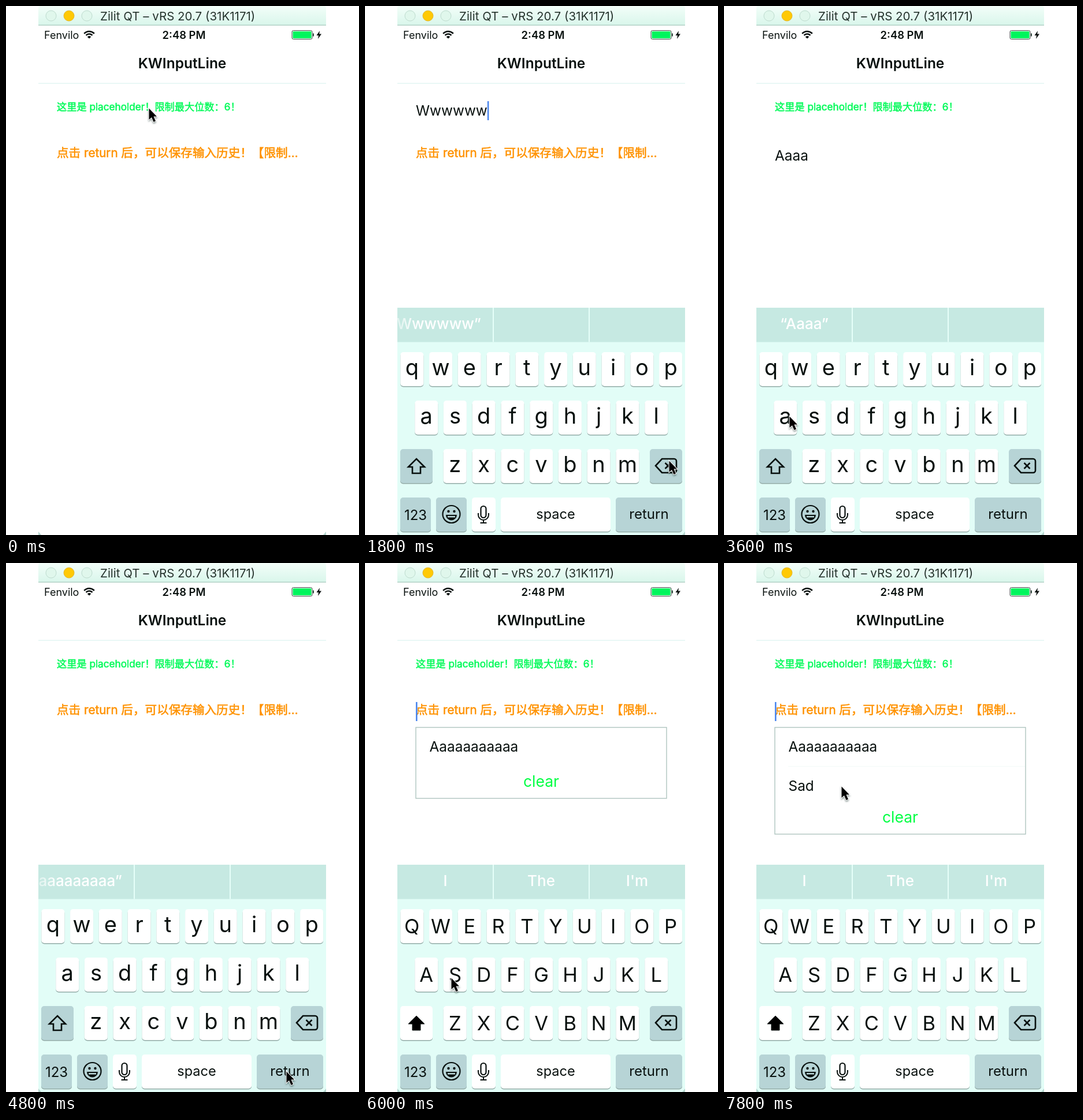
Write an HTML page with a canvas that moves like this. It is 611 px wide and 917 px high and loops after 8 s.

```html
<!DOCTYPE html>
<html lang="zh-CN">
<head>
<meta charset="utf-8">
<title>Input history</title>
<style>
html, body { margin: 0; width: 100%; height: 100%; overflow: hidden; background: #fff; }
canvas { display: block; }
</style>
</head>
<body>
<canvas id="stage" width="611" height="917"></canvas>
<script>
const ctx = document.getElementById('stage').getContext('2d');
const FONT = 'Inter, "Noto Sans CJK SC", "Noto Sans CJK", sans-serif';
const LOOP = 8000, STEP = 600;
const LEFT = 56, RIGHT = 554, MINT = '#e2fdf7', KEY_GREY = '#b7d4d6', INK = '#08100e';
const FIELD_SIZE = 24.4;
const LONG = 'A' + 'a'.repeat(10);
const START_WORDS = ['I', 'The', "I'm"];

// One entry per step: pointer, keyboard case, focused field, field texts, history.
const scenes = [
  { at: [247, 177] },
  { at: [133, 628], keys: 'upper', words: START_WORDS, caret: 1 },
  { at: [130, 632], keys: 'lower', words: ['“Wwwwww”'], first: 'Wwwwww', caret: 1 },
  { at: [526, 788], keys: 'lower', words: ['“Wwwwww”'], first: 'Wwwwww', caret: 1 },
  { at: [526, 788], keys: 'upper', words: START_WORDS, caret: 1 },
  { at: [113, 711], keys: 'upper', words: START_WORDS, caret: 2 },
  { at: [113, 711], keys: 'lower', words: ['“Aaaa”'], second: 'Aaaa' },
  { at: [113, 711], keys: 'lower', words: [`“${LONG}”`], second: LONG, caret: 2 },
  { at: [485, 881], keys: 'lower', words: [`“${LONG}”`] },
  { at: [250, 256] },
  { at: [149, 719], keys: 'upper', words: START_WORDS, caret: 2, history: [LONG] },
  { at: [485, 881], keys: 'lower', words: ['“Sad”'], second: 'Sad', caret: 2, history: [LONG] },
  { at: [253, 376] },
  { at: [203, 387], keys: 'upper', words: START_WORDS, caret: 2, history: [LONG, 'Sad'] }
];

function rect(x, y, w, h, color) {
  ctx.fillStyle = color;
  ctx.fillRect(x, y, w, h);
}

function text(str, x, y, size, { color = INK, weight = 400, align = 'left', outline = 0 } = {}) {
  ctx.font = `${weight} ${size}px ${FONT}`;
  ctx.fillStyle = color;
  ctx.textAlign = align;
  ctx.fillText(str, x, y);
  if (outline) {
    ctx.strokeStyle = color;
    ctx.lineWidth = outline;
    ctx.strokeText(str, x, y);
  }
}

function shape(points, fill, stroke, width = 2.4) {
  ctx.beginPath();
  points.forEach(([x, y]) => ctx.lineTo(x, y));
  ctx.closePath();
  paint(fill, stroke, width);
}

function circle(x, y, r, fill, stroke, width = 1) {
  ctx.beginPath();
  ctx.arc(x, y, r, 0, Math.PI * 2);
  paint(fill, stroke, width);
}

function paint(fill, stroke, width) {
  if (fill) { ctx.fillStyle = fill; ctx.fill(); }
  if (stroke) { ctx.strokeStyle = stroke; ctx.lineWidth = width; ctx.stroke(); }
}

function round(x, y, w, h, r, fill, stroke, width) {
  ctx.beginPath();
  ctx.roundRect(x, y, w, h, r);
  paint(fill, stroke, width);
}

function drawTitleBar() {
  const shade = ctx.createLinearGradient(0, 0, 0, 33);
  shade.addColorStop(0, '#f3fef9');
  shade.addColorStop(1, '#d9f6eb');
  round(LEFT, -1, RIGHT - LEFT, 34, [5, 5, 0, 0], shade);
  rect(LEFT, 32.5, RIGHT - LEFT, 1.5, '#b4d2c7');
  circle(78, 17, 9, '#e0f7ec', '#bddbce');
  circle(109, 17, 9, '#ffc905', '#e4b62a');
  circle(140, 17, 9, '#e0f7ec', '#bddbce');
  text('Zilit QT – vRS 20.7 (31K1171)', 163, 25, 20.5, { color: '#26322d' });
}

function drawStatusBar() {
  text('Fenvilo', 66, 57, 18);
  text('2:48 PM', 308, 57, 18.4, { weight: 600, align: 'center' });
  ctx.lineCap = 'butt';
  for (const r of [12, 7.5]) {
    ctx.beginPath();
    ctx.arc(144, 56, r, -Math.PI * 0.76, -Math.PI * 0.24);
    paint(null, INK, 2.5);
  }
  ctx.beginPath();
  ctx.moveTo(144, 56.5);
  ctx.arc(144, 56.5, 4.5, -Math.PI * 0.76, -Math.PI * 0.24);
  paint(INK);
  round(495, 42.5, 35, 15, 2.5, '#fff', '#33483f', 1);
  round(496.5, 44, 32, 12, 1, '#00f55d');
  rect(531, 47.5, 2, 5, '#33483f');
  shape([[543, 43], [537.5, 51], [541, 51], [540, 57], [546, 48.5], [542.2, 48.5]], INK);
}

function drawCaret(x, y) {
  rect(x, y, 2.6, 33, '#4b86ee');
}

function drawFields(scene) {
  text('KWInputLine', 305, 108, 24.5, { weight: 600, align: 'center' });
  rect(LEFT, 133.5, RIGHT - LEFT, 1.2, '#dcf3ef');

  let end = 88;
  if (scene.first) {
    text(scene.first, 88, 190, FIELD_SIZE);
    end += ctx.measureText(scene.first).width;
  } else {
    text('这里是 placeholder！限制最大位数：6！', 88, 181, 17.2, { color: '#00fa58', outline: 0.5 });
  }
  if (scene.caret === 1) drawCaret(end, 165);

  end = 88;
  if (scene.second) {
    text(scene.second, 88, 268, FIELD_SIZE);
    end += ctx.measureText(scene.second).width;
  } else {
    text('点击 return 后，可以保存输入历史！【限制…', 88, 262, 20.6, { color: '#ff9200', outline: 0.6 });
  }
  if (scene.caret === 2) drawCaret(end, 241);
}

function drawHistory(items) {
  const extra = (items.length - 1) * 62;
  rect(88, 285, 434, 123 + extra, '#fff');
  ctx.strokeStyle = '#a9c0bb';
  ctx.lineWidth = 1.3;
  ctx.strokeRect(88, 285, 434, 123 + extra);
  items.forEach((item, i) => {
    text(item, 111.5, 327 + i * 68, FIELD_SIZE);
    if (i) rect(111, 284 + i * 68, 410, 1, '#f3faf8');
  });
  text('clear', 305, 388 + extra, 26.5, { color: '#00ff43', align: 'center' });
}

function drawWords(words) {
  rect(LEFT, 523, RIGHT - LEFT, 59.5, '#c6e9e2');
  for (const x of [221, 387]) rect(x, 523, 2, 59.5, '#e6fff9');
  words.forEach((word, i) => {
    ctx.save();
    ctx.beginPath();
    ctx.rect(LEFT + i * 166, 523, 164, 59);
    ctx.clip();
    ctx.font = `500 26px ${FONT}`;
    if (ctx.measureText(word).width > 132) {
      const fade = ctx.createLinearGradient(LEFT, 0, LEFT + 34, 0);
      fade.addColorStop(0, 'rgba(255,255,255,.45)');
      fade.addColorStop(1, '#fff');
      text(word, 201, 560, 26, { color: fade, weight: 500, align: 'right' });
    } else {
      text(word, 139 + i * 166, 560, 26, { color: '#fff', weight: 500, align: 'center' });
    }
    ctx.restore();
  });
}

function drawKey(x, y, w, fill = '#fff') {
  round(x, y + 1.5, w, 59, 5, '#93aba7');
  round(x, y, w, 59, 5, fill);
}

function drawLetters(upper) {
  const rows = [['qwertyuiop', 61.3, 600], ['asdfghjkl', 86.2, 684], ['zxcvbnm', 135.8, 768]];
  for (const [letters, x, y] of rows) {
    [...letters].forEach((letter, i) => {
      const left = x + i * 49.75;
      drawKey(left, y, 40);
      if (upper) text(letter.toUpperCase(), left + 20, y + 42, 34.5, { align: 'center' });
      else text(letter, left + 20, y + 40, 38, { align: 'center' });
    });
  }
}

function drawShift(upper) {
  drawKey(61, 768, 56, upper ? '#fff' : KEY_GREY);
  shape([[89, 785], [103, 799], [96, 799], [96, 810], [82, 810], [82, 799], [75, 799]],
    upper ? '#000' : null, INK, upper ? 1 : 2.6);
}

function drawDelete() {
  drawKey(493, 768, 56, KEY_GREY);
  ctx.beginPath();
  ctx.moveTo(503, 797);
  ctx.lineTo(514, 785);
  ctx.arcTo(539, 785, 539, 797, 4);
  ctx.arcTo(539, 809, 514, 809, 4);
  ctx.lineTo(514, 809);
  ctx.closePath();
  paint(null, INK, 2.6);
  ctx.beginPath();
  for (const d of [-1, 1]) {
    ctx.moveTo(519.5, 797 - 5 * d);
    ctx.lineTo(529.5, 797 + 5 * d);
  }
  paint(null, INK, 2.6);
}

function drawEmoji() {
  drawKey(123, 852, 53, KEY_GREY);
  circle(149.5, 881, 15, null, INK, 2.2);
  circle(144.5, 876, 2.2, INK);
  circle(154.5, 876, 2.2, INK);
  ctx.beginPath();
  ctx.arc(149.5, 882, 9.5, 0, Math.PI);
  ctx.closePath();
  paint(INK);
  rect(143, 884, 13, 2.5, KEY_GREY);
}

function drawMic() {
  drawKey(185, 852, 41);
  round(200.5, 867, 9, 20, 4.5, null, INK, 2.2);
  ctx.beginPath();
  ctx.moveTo(196, 879);
  ctx.lineTo(196, 882);
  ctx.arc(205, 882, 9, Math.PI, 0, true);
  ctx.lineTo(214, 879);
  ctx.moveTo(205, 891);
  ctx.lineTo(205, 896);
  ctx.moveTo(199.5, 896);
  ctx.lineTo(210.5, 896);
  paint(null, INK, 2);
}

function drawKeyboard({ keys, words }) {
  const upper = keys === 'upper';
  rect(LEFT, 523, RIGHT - LEFT, 394, MINT);
  drawWords(words);
  drawLetters(upper);
  drawShift(upper);
  drawDelete();
  drawKey(61, 852, 53, KEY_GREY);
  text('123', 87.5, 891, 24, { align: 'center' });
  drawEmoji();
  drawMic();
  drawKey(235, 852, 190);
  text('space', 330, 889, 23.5, { align: 'center' });
  drawKey(434, 852, 115, KEY_GREY);
  text('return', 491.5, 889, 24, { align: 'center' });
}

function drawCorners() {
  shape([[LEFT, 911], [LEFT + 5, 917], [LEFT, 917]], '#b5d6cf');
  shape([[RIGHT, 911], [RIGHT - 5, 917], [RIGHT, 917]], '#b5d6cf');
}

function drawPointer([x, y]) {
  ctx.save();
  ctx.translate(x, y);
  ctx.shadowColor = 'rgba(0,30,20,.35)';
  ctx.shadowBlur = 3;
  ctx.shadowOffsetY = 2;
  const arrow = [[0.5, 0.5], [0.5, 20], [5, 16], [8.5, 24], [12, 22.5], [8.5, 14.5], [14, 14.5]];
  shape(arrow, '#fff', '#fff', 2);
  ctx.shadowColor = 'transparent';
  shape(arrow, '#000');
  ctx.restore();
}

function draw(time) {
  const scene = scenes[Math.floor((time % LOOP) / STEP)];
  rect(0, 0, 611, 917, '#fff');
  drawTitleBar();
  drawStatusBar();
  drawFields(scene);
  if (scene.history) drawHistory(scene.history);
  if (scene.keys) drawKeyboard(scene);
  drawCorners();
  drawPointer(scene.at);
}

function tick() {
  draw(performance.now());
  requestAnimationFrame(tick);
}
tick();
</script>
</body>
</html>
```
